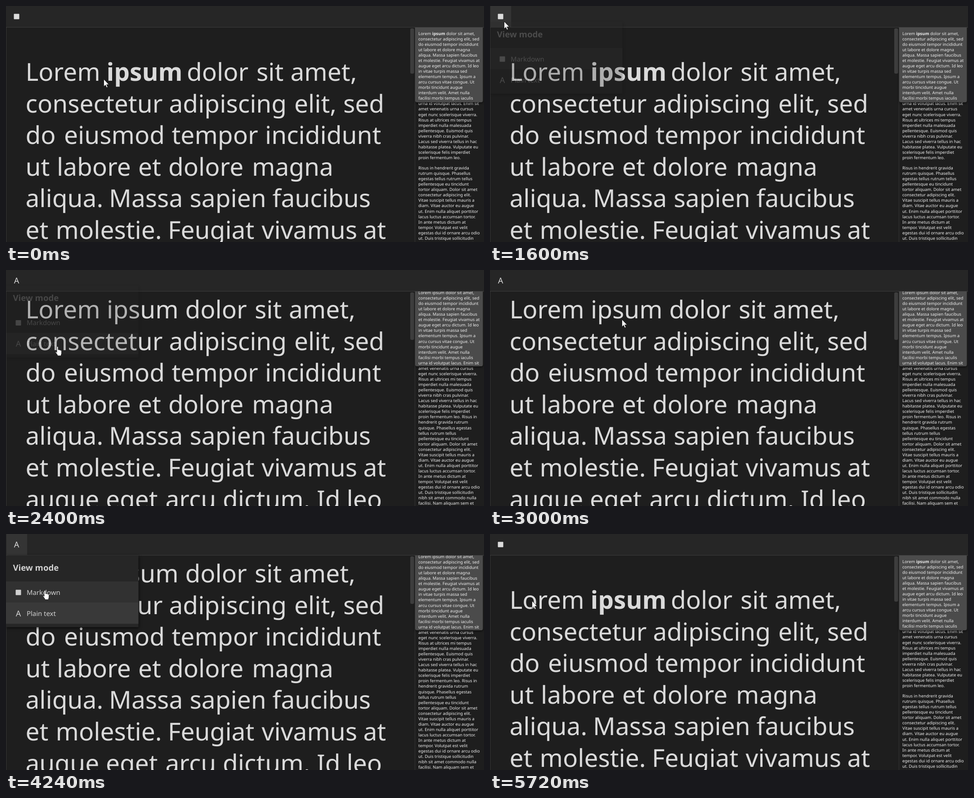
Recreate the animation shown at these times as an HTML page. Size 1063 px wide and 527 px high, loop 5840 ms.

```html
<!DOCTYPE html>
<html lang="en">
<head>
<meta charset="utf-8">
<title>View mode switch</title>
<style>
html, body { margin: 0; width: 100%; height: 100%; overflow: hidden; background: #1e1e1e; }
svg { display: block; width: 100vw; height: 100vh; }
text { font-family: "Noto Sans", "Open Sans", sans-serif; text-rendering: geometricPrecision; fill: #dadada; white-space: pre; }
.main { font-size: 55px; }
.side { font-size: 9.4px; fill: #f0f0f0; }
.bold { font-weight: 600; }
.slider { filter: drop-shadow(0 2px 2px #0009); }
#panel { filter: drop-shadow(1px 2px 3px #000a); }
#menu text { font-size: 14.9px; fill: #d2d2d2; }
#menu .title { font-size: 18.6px; font-weight: 600; }
text.glyph, #menu text.glyph { font-size: 18px; font-weight: 500; text-anchor: middle; }
#tip text { font-size: 4px; font-weight: 600; fill: #fff; text-anchor: middle; }
.cursor { fill: #fff; stroke: #111; stroke-width: .8; stroke-linejoin: round; }
</style>
</head>
<body>
<svg viewBox="0 0 1063 527">
  <rect width="1063" height="527" fill="#1e1e1e"/>
  <g id="markdown"></g>
  <g id="plain"></g>
  <path d="M.5 47V527M909.5 47V527" stroke="#353535"/>

  <rect width="1063" height="47" fill="#262626"/>
  <path d="M0 47.5H1063" stroke="#3b3b3b"/>
  <rect id="button" x="1" width="46" height="47" fill="#343434"/>
  <rect id="iconMarkdown" x="17.5" y="17.5" width="12" height="12" rx="1" fill="#dcdcdc"/>
  <text id="iconPlain" class="glyph" x="23.5" y="30">A</text>

  <g id="menu">
    <rect id="panel" y="48" width="294.5" height="160" fill="#262626"/>
    <rect id="rowMarkdown" y="106" width="294.5" height="47"/>
    <rect id="rowPlain" y="153" width="294.5" height="47.5"/>
    <text class="title" x="15.5" y="82">View mode</text>
    <rect x="21.5" y="124.5" width="12" height="12" rx="1" fill="#cfcfcf"/>
    <text x="46" y="136">Markdown</text>
    <text class="glyph" x="27.5" y="184">A</text>
    <text x="46" y="183">Plain text</text>
  </g>

  <g id="tip">
    <rect x="52" y="74" width="47" height="17.5" rx="1" fill="#0e0e0e"/>
    <text x="75.5" y="81.7">View mode</text>
    <text x="75.5" y="88.2">Content display mode</text>
  </g>

  <path id="arrow" class="cursor" d="M.5 .5V16.8L4.2 13.4 6.8 19.2 9.2 18.2 6.7 12.4H11.8Z"/>
  <path id="hand" class="cursor" d="M4 1.5c0-2 3-2 3 0v6c.5-1 2.6-.8 2.8.5.6-.8 2.3-.5 2.5.7.7-.6 2.2-.3 2.2 1v5c0 2-1 2.6-1.2 5.8H6c-.2-2-2.6-4.5-4.6-7.5C.5 11.6 2 10.8 3 12l1 1.2Z"/>
</svg>
<script>
const LOOP = 5840, STEP = 40;
const $ = id => document.getElementById(id);

// Each line: start position of a word, then the word; * marks bold.
const firstLine = {
  markdown: "43.5 Lorem 223.5 *ipsum 402 dolor 557 sit 632.5 amet,",
  plain: "43.5 Lorem 224 ipsum 398.5 dolor 553 sit 629 amet,"
};
const mainLines = [
  "43.5 consectetur 362.5 adipiscing 641 elit, 750 sed",
  "43.5 do 129 eiusmod 368.5 tempor 576 incididunt",
  "43.5 ut 113 labore 294 et 361 dolore 547 magna",
  "43.5 aliqua. 229 Massa 408.5 sapien 592.5 faucibus",
  "43.5 et 110.5 molestie. 360 Feugiat 568.5 vivamus 794.5 at",
  "43.5 augue 222 eget 354.5 arcu 482 dictum. 691 Id 757.5 leo"
];

const sideStart = `consectetur adipiscing elit, sed
do eiusmod tempor incididunt
ut labore et dolore magna
aliqua. Massa sapien faucibus
et molestie. Feugiat vivamus at
augue eget arcu dictum. Id leo
in vitae turpis massa sed
elementum tempus. Ipsum a
arcu cursus vitae congue. Ut
morbi tincidunt augue
interdum velit. Amet nulla
facilisi morbi tempus iaculis
urna id volutpat lacus. Enim sit
amet venenatis urna cursus
eget nunc scelerisque viverra.
Risus at ultrices mi tempus
imperdiet nulla malesuada
pellentesque. Euismod quis
viverra nibh cras pulvinar.
Lacus sed viverra tellus in hac
habitasse platea. Vulputate eu
scelerisque felis imperdiet`;
const sideJoin = {
  markdown: `proin fermentum leo.

Risus in hendrerit gravida
rutrum quisque. Phasellus
egestas tellus rutrum tellus`,
  plain: `proin fermentum leo. Risus in
hendrerit gravida rutrum
quisque. Phasellus egestas
tellus rutrum tellus`
};
const sideEnd = `pellentesque eu tincidunt
tortor aliquam. Dolor sit amet
consectetur adipiscing elit.
Vitae suscipit tellus mauris a
diam. Vitae auctor eu augue
ut. Enim nulla aliquet porttitor
lacus luctus accumsan tortor.
In ante metus dictum at
tempor. Volutpat est velit
egestas dui id ornare arcu odio
ut. Duis tristique sollicitudin
nibh sit amet commodo nulla
facilisi. Nam aliquam sem et`;

const bold = word => `<tspan class="bold">${word}</tspan>`;

function mainText(lines, top) {
  return lines.map((line, i) => {
    const words = line.replace(/([\d.]+) (\*?)(\S+)/g, (_, x, star, word) =>
      `<tspan x="${x}"${star && ' class="bold"'}>${word}</tspan>`);
    return `<text class="main" y="${top + i * 70.6}">${words}</text>`;
  }).join("");
}

function sideText(lines, top) {
  let y = top;
  return lines.map(line => {
    const text = `<text class="side" x="917" y="${y}">${line}</text>`;
    y += line ? 12.06 : 11;
    return text;
  });
}

function buildPage(mode, mainTop, sideTop, coveredLines, thumbHeight) {
  const ipsum = mode === "markdown" ? bold("ipsum") : "ipsum";
  const lines = [`Lorem ${ipsum} dolor sit amet,`,
    ...[sideStart, sideJoin[mode], sideEnd].join("\n").split("\n")];
  const side = sideText(lines, sideTop);
  $(mode).innerHTML = mainText([firstLine[mode], ...mainLines], mainTop) +
    side.slice(coveredLines).join("") +
    `<path class="slider" d="M910 48H1060.5V211q0 4-4 4H914q-4 0-4-4Z" fill="#4b4b4b"/>` +
    side.slice(0, coveredLines).join("") +
    `<rect x="899" y="50" width="8.5" height="${thumbHeight}" rx="3" fill="#3d3d3d"/>`;
}
buildPage("markdown", 167, 64.6, 13, 101);
buildPage("plain", 108, 54, 14, 106);

// Pointer waypoints: time, x, y
const path = [
  [0, 217, 163], [280, 390, 173], [520, 342, 171], [640, 342, 171],
  [1200, 18, 50], [1400, 31, 34], [1640, 31, 34], [1800, 48, 74],
  [1960, 98, 181], [2080, 109, 171], [2440, 109, 171], [2720, 346, 118],
  [2840, 346, 118], [3400, 79, 76], [3600, 33, 34], [3760, 33, 34],
  [4000, 62, 90], [4240, 81, 126], [5040, 81, 126], [5080, 84, 128],
  [5360, 84, 142], [5640, 84, 142], [5720, 93, 149], [LOOP, 93, 149]
];

function pointerAt(t) {
  const i = path.findIndex(point => point[0] > t);
  const [t0, x0, y0] = path[i - 1], [t1, x1, y1] = path[i];
  const p = (t - t0) / (t1 - t0), k = p * p * (3 - 2 * p);
  return [x0 + (x1 - x0) * k, y0 + (y1 - y0) * k];
}

const within = (t, from, to) => t >= from && t < to;
const easeOut = (t, start) => {
  const p = Math.min(1, Math.max(0, (t - start) / 300));
  return 1 - (1 - p) ** 2;
};
const show = (id, on) => $(id).setAttribute("visibility", on ? "visible" : "hidden");
const rowFill = (selected, hovered) => selected ? "#393939" : hovered ? "#313131" : "none";

function draw(t) {
  const plain = within(t, 2240, 4440);
  show("markdown", !plain);
  show("iconMarkdown", !plain);
  show("plain", plain);
  show("iconPlain", plain);
  show("button", within(t, 1320, 2240) || within(t, 3520, 4440));
  show("tip", within(t, 3640, 3760));

  const open = easeOut(t, 1560) - easeOut(t, 2240) + easeOut(t, 3760) - easeOut(t, 4440);
  $("menu").setAttribute("opacity", open);
  $("menu").setAttribute("transform", `translate(0 ${-16 * (1 - open)})`);
  $("rowMarkdown").setAttribute("fill", rowFill(!plain, within(t, 4080, 4440)));
  $("rowPlain").setAttribute("fill", rowFill(plain, within(t, 1920, 2240)));

  const hand = within(t, 1840, 2480) || within(t, 3560, 5080);
  show("hand", hand);
  show("arrow", !hand);
  $(hand ? "hand" : "arrow").setAttribute("transform", `translate(${pointerAt(t).map(Math.round)})`);
}

function tick() {
  const t = performance.now() % LOOP;
  draw(Math.floor(t / STEP) * STEP);
  requestAnimationFrame(tick);
}
tick();
</script>
</body>
</html>
```
